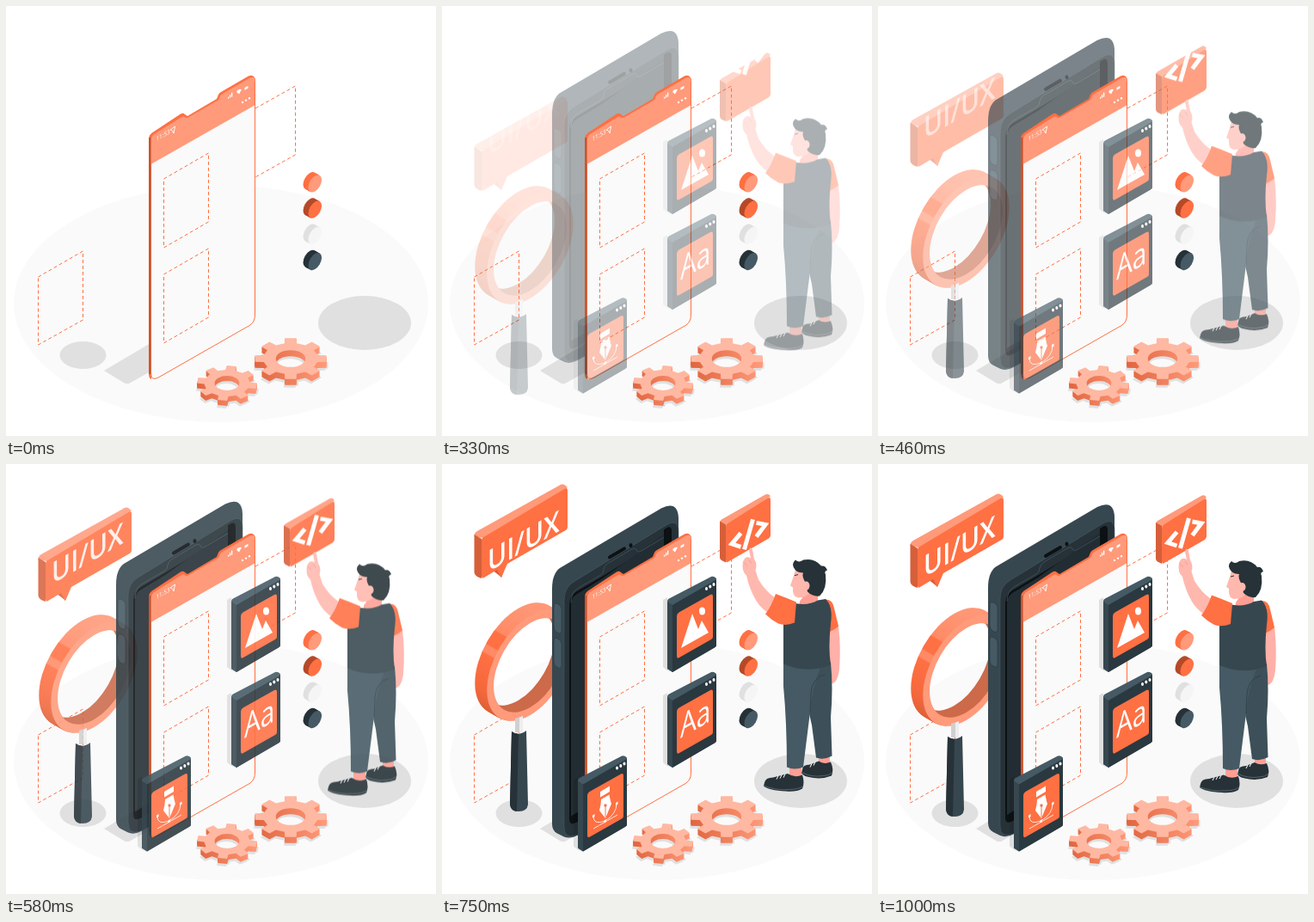
Animation, 500 px wide and 500 px high, one loop 1.04 s. Source, as an HTML page:

```html
<!DOCTYPE html>
<html lang="en">
<head>
<meta charset="utf-8">
<title>Interface design</title>
<style>
html, body { margin: 0; width: 100%; height: 100%; overflow: hidden; background: #fff; }
svg { display: block; width: 100vw; height: 100vh; }
text { font-family: "Open Sans", "Noto Sans", sans-serif; fill: #fff; }
.dash { fill: none; stroke: #ff7043; stroke-width: 1; stroke-dasharray: 4 3; }
.line { fill: none; stroke: #fff; }
</style>
</head>
<body>
<svg viewBox="0 0 500 500">
  <defs>
    <linearGradient id="gearSide"><stop offset="0" stop-color="#e0653f"/><stop offset="1" stop-color="#ff9a7a"/></linearGradient>
    <linearGradient id="rim" x1=".7" y1="0" x2=".2" y2="1">
      <stop offset="0" stop-color="#ff9a7a"/><stop offset=".25" stop-color="#ff8a65"/>
      <stop offset=".26" stop-color="#ff7043"/><stop offset=".36" stop-color="#ff7043"/>
      <stop offset=".37" stop-color="#ff8a65"/><stop offset=".42" stop-color="#ff8a65"/>
      <stop offset=".43" stop-color="#ff7043"/><stop offset=".7" stop-color="#f5683c"/><stop offset="1" stop-color="#cf5a35"/>
    </linearGradient>
    <g id="plate">
      <path d="M257 158L262 155V238L267 242L262 240L257 236Z" fill="#000" opacity=".11"/>
      <path d="M262 160Q262 157 265 156L313 131Q316 130 319 133V212L268 242L262 238Z" fill="#455a64"/>
      <path d="M262 160L268 164V242L262 238Z" fill="#37474f"/>
      <path d="M268 164L319 134.500V210Q319 212 317 213.500L268 242Z" fill="#2a383f"/>
      <path d="M273 177Q273 174 275.500 172.500L312 152Q315 150.500 315 154V201Q315 203 313 204L276 225Q273 227 273 223Z" fill="#ff7043"/>
      <g fill="#fff"><ellipse cx="307.500" cy="145" rx="1.500" ry="2"/><ellipse cx="311.800" cy="142.500" rx="1.500" ry="2"/><ellipse cx="316" cy="140" rx="1.500" ry="2"/></g>
    </g>
  </defs>

  <ellipse cx="250" cy="346" rx="241" ry="138" fill="#fafafa"/>
  <g fill="#e0e0e0">
    <ellipse cx="417" cy="368.500" rx="54" ry="31.500"/>
    <ellipse cx="89.500" cy="406" rx="27" ry="16"/>
    <path d="M114 424L168 392V425L143 439Q140 440 137 438Z"/>
  </g>
  <path class="dash" d="M37.500 315L89.500 285V365L37.500 394Z"/>
  <g id="gears"></g>

  <g id="lens">
    <g id="ring"></g>
    <path d="M85 302L94 299V318H85Z" fill="#d0d0d0"/><path d="M90 301L94 299V318H90Z" fill="#eee"/>
    <path d="M81 317Q89 323 98 316L100 402Q99 410 89 410Q80 410 79 402Z" fill="#37474f"/>
    <path d="M81 317Q85 320 89 320L87 410Q80 409 79 402Z" fill="#263238"/>
  </g>

  <g id="bubble">
    <path d="M37.500 95Q37.500 91 41 89L138 35Q140 34 142 35L146 38L47 97Z" fill="#ff9a7a"/>
    <path d="M37.500 93L46 98V144Q38 142 37.500 137Z" fill="#d65f3a"/>
    <path d="M58 134L67 141L69 143L74 130Z" fill="#d65f3a"/>
    <path d="M46 100Q46 97 49 95.500L143 39.500Q146 38 146 42V84Q146 87 143 88.500L76 127L69 143L64 134L49 143Q46 145 46 141Z" fill="#ff7043"/>
  </g>
  <g id="label"><text transform="matrix(.866 -.5 0 1 53 132)" font-size="34.500" font-weight="600">UI/UX</text></g>

  <g id="phone">
    <path d="M128 144Q128 126 137 119.500L255 50Q274 41 275 61V365L158 430Q149 435 142 432L134 428Q128 425 128 417Z" fill="#37474f"/>
    <path d="M142 157Q142 142 154 135L260 70Q275 61 275 77V365L157 430Q142 436 142 420Z" fill="#263238" stroke="#455a64" stroke-width=".6"/>
    <path d="M148 163Q148 152 156 147L185 130L258 85V75Q267 68 267 77V350L157 415Q148 420 148 411Z" fill="#0c1114"/>
    <path d="M150 163Q150 153 158 149L186 132L258 80V350L160 402L150 408Z" fill="#222d33"/>
    <path d="M150 160Q150 148 158 143L184 128Q188 126 188 121Q189 116 193 114L220 98Q226 95 226 99Q228 102 231 100L258 84" fill="none" stroke="#455a64" stroke-width=".7"/>
    <path d="M195 107L212 97" stroke="#0c1114" stroke-width="4" stroke-linecap="round"/>
    <ellipse cx="219.500" cy="93" rx="2" ry="2.500" fill="#0c1114"/>
    <g fill="#455a64" stroke="#263238" stroke-width=".5">
      <path id="key" d="M130 165Q130 159 134 161Q139 163 139 168V191Q139 197 135 195Q130 193 130 187Z"/>
      <use href="#key" y="40.500"/>
    </g>
  </g>

  <path class="dash" d="M290 119L336.500 93V173L290 199"/>
  <path d="M166 155Q166 149 172 146L203 125.500Q206 124 208 126L211 128L245 108L247 103Q248 101 250 100L281 82Q286 79 289 83L290 86L240 120L169 165V434Q166 433 166 428Z" fill="#ff7043"/>
  <path d="M168.500 158Q168.500 151 174 148L203 130Q206 128 208 129.500Q210 131 213 129L246 110Q248 109 248.500 106Q249 104 252 102L283 84Q289.500 80.500 289.500 88V359Q289.500 367 284 371L178 431.500Q168.500 437 168.500 427Z" fill="#fafafa" stroke="#ff7043"/>
  <path d="M168.500 184V158Q168.500 151 174 148L203 130Q206 128 208 129.500Q210 131 213 129L246 110Q248 109 248.500 106Q249 104 252 102L283 84Q289 80.500 289 88V115.500Z" fill="#ff9a7a"/>
  <path d="M167.300 153V428" stroke="#c9532e" stroke-width="2.400"/>
  <text transform="matrix(.866 -.5 0 1 174.500 157.500)" font-size="7.300">11:53</text>
  <path d="M191 144L196.500 140L195 148L193.500 145Z" fill="none" stroke="#fff" stroke-width=".9"/>
  <g fill="#fff">
    <path d="M258 108v-2l1.300-.7v2zM260 107v-3.500l1.300-.7v3.500zM262 106v-5l1.300-.7v5z"/>
    <path d="M268 100Q270 96 274 97L271 102.500Z"/>
    <path d="M277.500 95L281.500 92.700V95.500L277.500 97.800Z"/>
    <circle cx="275" cy="112" r="1.200"/><circle cx="279" cy="109.600" r="1.200"/><circle cx="283" cy="107.200" r="1.200"/>
  </g>
  <path class="dash" d="M183.500 201L235.500 171V251L183.500 281Z"/>
  <path class="dash" d="M183.500 312L235.500 282V362L183.500 392Z"/>

  <g id="cards">
    <use href="#plate"/>
    <path d="M278 214L291 174L298 192L302 182L310 196Z" fill="#fff"/>
    <ellipse cx="302.500" cy="171" rx="3.500" ry="4.500" fill="#fff"/>
    <use href="#plate" y="111"/>
    <text transform="matrix(.78 -.45 0 1 277 319)" font-size="38">Aa</text>
    <use href="#plate" x="-104" y="208.500"/>
    <path d="M184 381L195 374.500V381L184 387.500Z" fill="#fff"/>
    <path d="M185 390L194.500 384.500Q196 393 197 395L190 412Q187 408 183 403Q185 396 185 390Z" fill="#fff"/>
    <path d="M190 411V398" stroke="#ff7043"/><circle cx="190" cy="397" r="1.700" fill="#ff7043"/>
    <path class="line" stroke-width=".8" d="M176 410Q176 420 189.500 415Q203 407 203 395M176 424L204 408"/>
    <path d="M175 408.500l2.500-1.400v3l-2.500 1.400zM202 394l2.500-1.400v3l-2.500 1.400zM188.500 414.500l2.500-1.400v3l-2.500 1.400z" fill="#fff"/>
  </g>
  <g id="dots"></g>

  <g id="person">
    <path d="M323 70Q323 67 326 65.500L376 37Q380 35 382 39L331 74Z" fill="#ff9a7a"/>
    <path d="M323 68L330 72V116L325 113.500Q323 112 323 110Z" fill="#d65f3a"/>
    <path d="M330 75Q330 72 332.500 70.500L379 41Q382 39 382 43V84Q382 86.500 380 88L333 115Q330 117 330 113Z" fill="#ff7043"/>
    <path id="tag" class="line" stroke-width="5" d="M347.500 79L337 91.500L347.500 95M351.500 98L361.500 63M365.500 67L376 69L365.500 83"/>

    <path d="M404 346H418V368H404ZM438 335H451V354H438Z" fill="#ff9f94"/>
    <g fill="#263238">
      <path d="M419 357Q419 351 428 351L438 347Q444 351 452 348Q456 357 453 364Q443 368 432 366.500Q420 365 418 361Z"/>
      <path d="M375 372Q376 366 385 366L402 361.500Q410 367 419 363Q422 372 419 379Q412 383 400 382Q380 381 374 376Z"/>
    </g>
    <path d="M374 375.500Q388 381 403 380Q414 380 420 376M418 360Q430 366 443 364Q450 364 454 360" fill="none" stroke="#607078" stroke-width=".8"/>
    <path class="line" stroke-width="1" d="M391 364l-2 4M395 363l-2 4M399 362l-2 4M430 350l-2 4M434 348l-2 4"/>
    <path d="M449 195L461 189Q464 215 462 240Q460 256 453 257Q449 253 451 241Z" fill="#ffb0a8"/>
    <path d="M445 159Q454 158 456 169L461 190Q456 195 449 197Z" fill="#ff7043"/>
    <path d="M420 232H452Q455 262 452 296L453.500 341Q444 346 435 343L430 305L422 270Z" fill="#3d5059"/>
    <path d="M397 230L440 238Q430 262 428 290Q424 322 420 354Q410 358 401 354Q401 302 397 260Z" fill="#455a64"/>
    <path d="M445 246Q430 250 429 268L428 290" fill="none" stroke="#2e3e46" stroke-width=".8"/>
    <path d="M358 99Q361 98 361.500 104L363 112Q367 118 364.500 125L368 136Q376 149 386 156L397 163L387 179Q372 172 365 160Q357 146 354 131Q348 126 350 115Q353 107 359 111L357 102Z" fill="#ffb8ae"/>
    <path d="M351 116L355 120M357 113L360 117" stroke="#ed9288" stroke-width=".7"/>
    <path d="M418 147L437 149V170H415L416 161L419 157Z" fill="#ff9f94"/>
    <path d="M408 163Q425 167 437 160L446 158.500Q455 167 452 187Q449 215 452 235Q425 246 397 234V186L404 178Z" fill="#37474f"/>
    <path d="M388 152.500Q400 157 412 162L410 186Q400 190 391 187Q383 183 376 176Q383 167 388 152.500Z" fill="#ff7043"/>
    <path d="M412 121Q408 135 405 143L408 145Q407 156 414 157Q424 157 429 149L433 125Z" fill="#ffb8ae"/>
    <path d="M411 125Q405 118 411 113Q415 117 420 113Q433 110 441 120Q446 119 448 125Q444 126 446 130Q448 147 439 155Q431 156 425 150L423 140Q418 132 420 128Q414 128 411 125Z" fill="#263238"/>
    <ellipse cx="423.500" cy="143" rx="4" ry="5" fill="#ffb8ae"/>
    <path d="M410 131l4-1" stroke="#263238"/>
  </g>
</svg>
<script>
const $ = id => document.getElementById(id);
const ISO = '.866 -.5 0 1';

// Flat gear lying on the floor, extruded by stacking copies.
function gear(cx, cy, rx, ry, depth, turn) {
  const point = (a, r) => `${(rx * r * Math.cos(a)).toFixed(1)} ${(ry * r * Math.sin(a)).toFixed(1)}`;
  const pts = [];
  for (let i = 0; i < 8; i++) {
    const a = (i + turn) * Math.PI / 4;
    for (const [da, r] of [[-.22, .76], [-.16, 1], [.16, 1], [.22, .76]]) pts.push(point(a + da, r));
  }
  const h = [rx * .41, ry * .41];
  const d = `M${pts.join('L')}ZM${-h[0]} 0a${h} 0 1 0 ${2 * h[0]} 0a${h} 0 1 0 ${-2 * h[0]} 0Z`;
  const layer = (x, y, fill) =>
    `<path d="${d}" transform="translate(${x} ${y})" fill="${fill}" fill-rule="evenodd"/>`;
  let out = layer(cx - 1, cy + depth + 3, '#e0e0e0') + layer(cx + 2, cy + depth + 1, '#e0e0e0');
  for (let y = depth; y > 0; y--) out += layer(cx, cy + y, 'url(#gearSide)');
  return out + layer(cx, cy, '#ffb8a2');
}
$('gears').innerHTML = gear(257, 438.5, 35, 20.5, 6, .2) + gear(331, 410, 42, 24, 7, 0);

// Disc standing upright in the isometric plane.
const disc = (x, y, r, fill) => `<circle r="${r}" transform="matrix(${ISO} ${x} ${y})" fill="${fill}"/>`;
const swatches = [['#ff9a7a', '#ff7043'], ['#ff7043', '#b54a28'], ['#f5f5f5', '#e0e0e0'], ['#455a64', '#263238']];
$('dots').innerHTML = swatches.map(([face, side], i) => {
  const y = 206.5 + 30.2 * i;
  let out = '';
  for (let s = 6; s > 0; s--) out += disc(359.3 - s, y - s * .55, 9, side);
  return out + disc(359.3, y, 9, face);
}).join('');

// Ring: rim behind, inner wall, then the front face.
function annulus(x, y, r, hole, fill) {
  const arc = q => `M${-q} 0a${q} ${q} 0 1 0 ${2 * q} 0a${q} ${q} 0 1 0 ${-2 * q} 0Z`;
  return `<path d="${arc(r)}${arc(hole)}" transform="matrix(${ISO} ${x} ${y})" fill="${fill}" fill-rule="evenodd"/>`;
}
let ring = '';
for (let s = 14; s > 0; s--) {
  const x = 102.5 - s, y = 240 - s * .57;
  ring += annulus(x, y, 58, 53, 'url(#rim)') + annulus(x, y, 53, 49, '#cc6a4a');
}
$('ring').innerHTML = ring + annulus(102.5, 240, 58, 49, '#ff9a7a');

// Overshooting cubic-bezier(.36, -.01, .5, 1.38)
function ease(t) {
  const bez = (s, a, b) => 3 * (1 - s) ** 2 * s * a + 3 * (1 - s) * s * s * b + s ** 3;
  let lo = 0, hi = 1;
  for (let i = 0; i < 24; i++) {
    const mid = (lo + hi) / 2;
    if (bez(mid, .36, .5) < t) lo = mid; else hi = mid;
  }
  return bez(hi, -.01, 1.38);
}

const STEPS = [2, 5, 8, 11, 14, 18, 21, 24];
const lens = { dy: [66, 55, 42, 23, 8, -6, -7, 0], alpha: [0, .06, .26, .57, .87, 1, 1, 1] };
const bubble = { dy: [125, 99, 71, 43, 16, -11, -12, 0], alpha: [0, .02, .15, .46, .85, 1, 1, 1] };

function along(values, k) {
  if (k <= STEPS[0]) return values[0];
  const i = STEPS.findIndex(s => s >= k);
  const u = (k - STEPS[i - 1]) / (STEPS[i] - STEPS[i - 1]);
  return values[i - 1] + (values[i] - values[i - 1]) * u;
}

function pose(id, dy, alpha) {
  $(id).setAttribute('transform', `translate(0 ${dy.toFixed(2)})`);
  $(id).setAttribute('opacity', Math.max(0, Math.min(1, alpha)).toFixed(3));
}

const LOOP = 1040;
const start = performance.now();

function draw() {
  const t = (performance.now() - start) % LOOP;
  // 24 steps a second, each starting on a multiple of 10 ms
  let k = 24;
  while (k > 0 && Math.round(k * 100 / 24) * 10 > t) k--;
  const p = k < 2 ? 0 : ease(k / 24);
  const slide = 30 * (1 - p);
  pose('phone', -slide, p);
  pose('person', slide, p);
  pose('tag', -2 * slide, 1); // drops in while its box rises
  pose('cards', 0, p);
  pose('lens', along(lens.dy, k), along(lens.alpha, k));
  pose('bubble', along(bubble.dy, k), along(bubble.alpha, k));
  pose('label', along(lens.dy, k), along(lens.alpha, k));
  requestAnimationFrame(draw);
}
draw();
</script>
</body>
</html>
```
